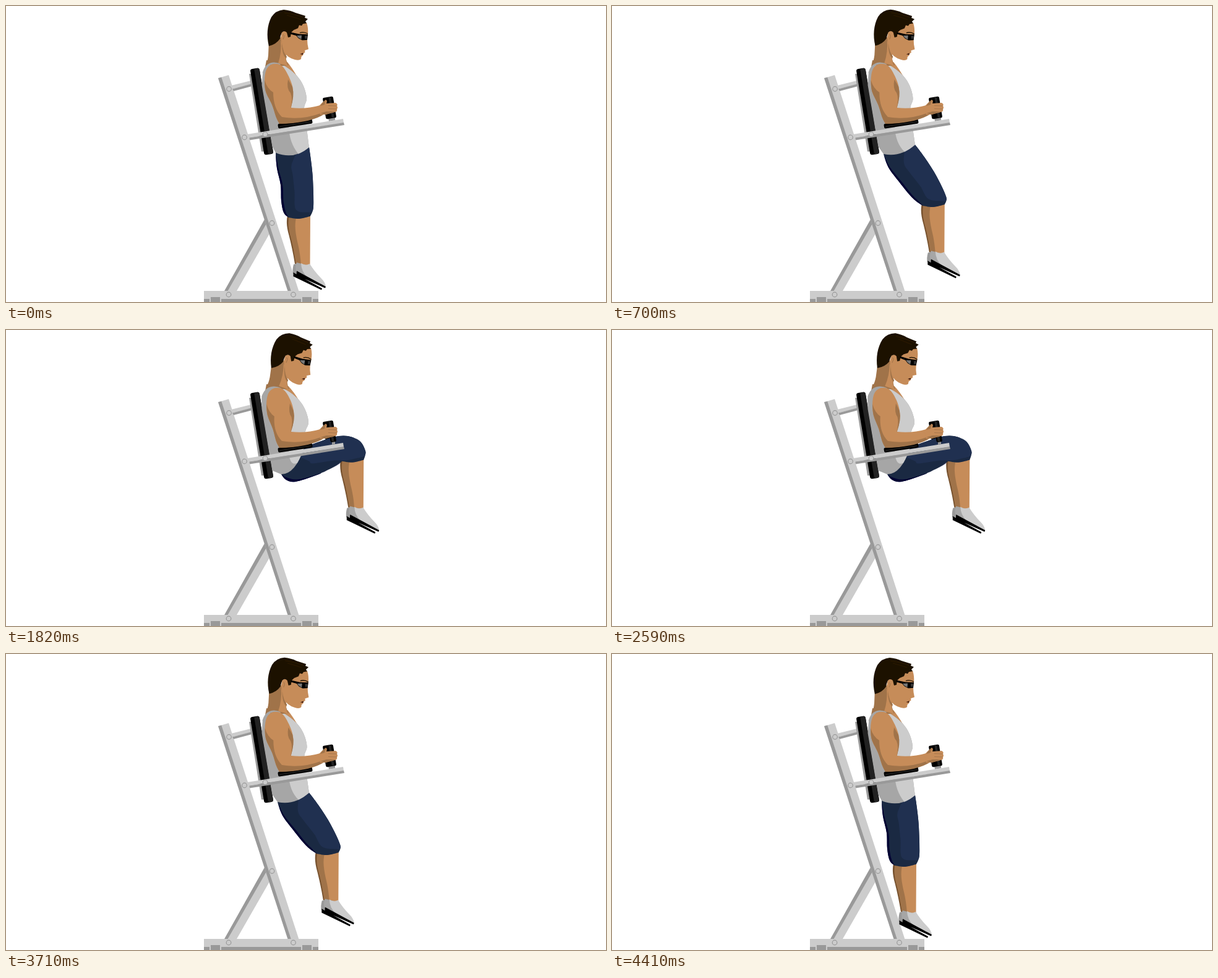
An HTML page that plays this animation: 970 px wide and 480 px high, repeating every 4550 ms.

```html
<!DOCTYPE html>
<html lang="en">
<head>
<meta charset="utf-8">
<title>Captain's chair knee raise</title>
<style>
html, body { margin: 0; width: 100%; height: 100%; overflow: hidden; background: #fff; }
svg { display: block; width: 970px; height: 480px; }
.light { fill: #ccc; }
.mid { fill: #a6a6a6; }
.dark { fill: #999; }
.skin { fill: #c68c59; }
.shade { fill: #a07349; }
.deep { fill: #77522f; }
.black { fill: #000; }
.soft { fill: #222; }
.hair { fill: #1c1100; }
.bolt { fill: #ccc; stroke: #999; stroke-width: 1.2; }
</style>
</head>
<body>
<svg viewBox="0 0 970 480">
  <!-- frame -->
  <path class="light" d="M419 347L437 350L373 462H354Z"/>
  <path class="dark" d="M418 346L421 353L358.500 462H353Z"/>
  <path class="light" d="M343 117L360 112L473.300 462H455.500Z"/>
  <path class="dark" d="M343 117L348.200 115.500L460.700 462H455.500Z"/>
  <path class="light" d="M320 462H505V480H320Z"/>
  <path class="dark" d="M320 475H329V480H320ZM331 472H346V480H331ZM348 475H477V480H348ZM479 472H494V480H479ZM496 475H505V480H496Z"/>
  <path class="light" d="M364 129L396 121V127L366 134.500Z"/>
  <path class="dark" d="M366 134.500L396 126.500V130.500L368 138Z"/>
  <path class="dark" d="M393 110H398L418 236H413Z"/>
  <g transform="translate(413.500 171) rotate(-9.400)">
    <rect class="black" x="-7.500" y="-70.500" width="15" height="141" rx="3.500"/>
    <rect class="soft" x="-1" y="-70.500" width="8.500" height="141" rx="3"/>
  </g>

  <!-- far handle -->
  <path class="dark" d="M521 182L527 181V186L522 187Z"/>
  <rect class="black" x="-8.500" y="-17.500" width="11" height="35" rx="2.500" transform="translate(523 165) rotate(-9.400)"/>

  <!-- lower leg -->
  <g id="shin">
    <path class="deep" d="M456 336C453 346 453 356 457.500 372C461 386 464.500 402 467 418H478L474 336Z"/>
    <path class="shade" d="M459 336C455 350 456 360 461 378C465 394 467 408 469 419H480L478 336Z"/>
    <path class="skin" d="M471 336C466 352 467 362 471 382C475 398 476 408 477 420H491.500L492 336Z"/>
    <path class="dark" d="M465 419Q462.500 428 464 434L472 438V417Z"/>
    <path class="mid" d="M470 416Q467 423 469 430L492 443L486 420Z"/>
    <path class="light" d="M477 417Q484 422 491 418C496 426 502 434 510 442Q516 448 517 455L488 441Q477 430 477 417Z"/>
    <path class="black" d="M464.500 432L471 436L511 458L510 460.500L464.500 438.500ZM470 429.500L517 455L516 457.500L469.500 436.500Z"/>
  </g>

  <!-- shorts -->
  <path id="shorts" fill="#1a2942"/>
  <path id="panel" fill="#203050"/>
  <path id="rim" fill="#000033"/>

  <!-- torso -->
  <path id="neck" class="shade"/>
  <path id="chestSkin" class="skin"/>
  <path id="shirtBack" class="mid"/>
  <path id="shirtFront" class="light"/>

  <!-- head -->
  <g id="head">
    <path class="shade" d="M425 56L424 80Q423 90 420 95L440 98L457 96Q451 88 453 76L448 50Z"/>
    <path class="skin" d="M444 55Q446 75 440 93L456 97Q451 89 453 76Z"/>
    <path class="skin" d="M446 42L462 38L474 28L486 27Q489 36 488 45L487 54Q487 62 489 70L483 72L483.500 75L481 77L480 80L477.500 82L477 86Q474 89 467 87Q453 83 449 73L444 52Z"/>
    <path class="shade" d="M446 60Q448 76 454 82L453 85Q446 79 446 60Z"/>
    <path class="hair" d="M425 65C421 48 422 32 429 18Q436 7 449 6Q460 7 468 11L484 16L483 19L488 21L484 25L486 28L480 29L478 32L474 31L472 36L465 39L461 43L460 50L456 51L454 43Q450 39 446 43Q444 47 443 53Q437 62 425 65Z"/>
    <path d="M450 11L466 14L480 18M454 15L468 19L477 22" fill="none" stroke="#2d1a00"/>
    <path class="skin" d="M446 43Q453 40 454 47Q453 54 449 55Q445 53 446 43Z"/>
    <path d="M448 46Q451 48 448 54" fill="none" stroke="#a07349"/>
    <path class="black" d="M460 42.500L474 45.500L488 46L487 55L479 55.500L473 52.500L469 48L460 45.500Z"/>
    <path d="M470 48L478 47.500L477.500 54L473 51.500Z" fill="#777"/>
    <path d="M483 48H487V53H483Z" fill="#333"/>
    <path d="M475 43.500Q481 41 488 45" fill="none" stroke="#1c1100" stroke-width="1.300"/>
    <path d="M475.500 78L480.500 76L480 79Z" fill="#3a160c"/>
  </g>
  <path id="strap" fill="none" stroke="#a6a6a6" stroke-width="3"/>

  <!-- arm rest -->
  <path class="light" d="M387 208.500L545 183L546 189.500L389 214Z"/>
  <path class="dark" d="M393 213.500L546 189L547 193L394 217.500Z"/>
  <g transform="translate(467.500 190.800) rotate(-8.500)">
    <rect class="black" x="-28" y="-3.800" width="56" height="7.600" rx="2"/>
    <rect class="soft" x="-26" y="0" width="52" height="1.500"/>
  </g>
  <path class="dark" d="M527 181L532 180V185L527 186Z"/>
  <g transform="translate(523 165) rotate(-9.400)">
    <rect class="black" x="-1" y="-17.500" width="9.500" height="35" rx="2.500"/>
    <rect class="soft" x="1" y="-16.500" width="4" height="33"/>
  </g>
  <g id="bolts"></g>

  <!-- arm -->
  <path id="arm" class="skin"/>
  <path id="armShade" class="shade"/>
  <path id="crease" class="shade"/>
  <path class="skin" d="M505 163L511 157L517 152Q520 153 518 158L533 157Q537 159 535 162Q537 165 535 167Q536 171 532 172L517 176L508 176Z"/>
  <path class="shade" d="M508 162L513 155L517 152L515 160ZM508 174L518 171L532 171L517 176Z"/>
  <path d="M521 161.500L535 162M521 166.500L535 167" fill="none" stroke="#a07349" stroke-width=".8"/>
</svg>
<script>
const $ = id => document.getElementById(id);
const STEP = 70, STEPS = 65, TOP = 30;
const HIP = [456, 230], THIGH = 106, REST = 9;
const rad = a => a * Math.PI / 180;

// Shorts outline at four thigh angles: back edge, front edge, then the shirt hem control.
const ANGLES = [0, 27, 66, 95];
const POSES = [
  [436,238, 438,263, 444,290, 445,316, 449,335, 497,325, 496,280, 493,250, 490,229, 466,250],
  [439,240, 447,262, 464,285, 480,305, 491,316, 540,309, 524,275, 505,245, 490,225, 466,246],
  [441,236, 450,249, 470,258, 505,264, 532,269, 582,248, 565,228, 525,214, 492,210, 477,241],
  [445,234, 453,243, 468,246, 500,236, 530,222, 581,196, 569,178, 538,172, 482,190, 468,234]
].map(n => Array.from({ length: n.length / 2 }, (_, i) => [n[2 * i], n[2 * i + 1]]));
const HEM = [[457, 343], [474, 345], [492, 341]];
const PINNED = [0, 8, 9];

const mix = (a, b, t) => [a[0] + (b[0] - a[0]) * t, a[1] + (b[1] - a[1]) * t];
const add = (a, b) => [a[0] + b[0], a[1] + b[1]];

function turn(p, deg) {
  const c = Math.cos(rad(deg)), s = Math.sin(rad(deg));
  const x = p[0] - HIP[0], y = p[1] - HIP[1];
  return [HIP[0] + x * c - y * s, HIP[1] + x * s + y * c];
}

// Smooth curve through points, without the leading command.
function curve(pts) {
  return pts.map((q, i) => {
    if (!i) return q.join(" ");
    const a = pts[i - 2] || pts[i - 1], b = pts[i - 1], d = pts[i + 1] || q;
    const c1 = add(b, [(q[0] - a[0]) / 6, (q[1] - a[1]) / 6]);
    const c2 = add(q, [(b[0] - d[0]) / 6, (b[1] - d[1]) / 6]);
    return `C${[...c1, ...c2, ...q].join(" ")}`;
  }).join("");
}

const set = (id, d) => $(id).setAttribute("d", d);

// Sine ease with a slightly quicker start.
function thighAngle(k) {
  const t = k / TOP, u = Math.PI * t;
  return 99 * (1 - Math.cos(u)) / 2 + 4 * Math.sin(u) * (1 - t);
}

function poseAt(angle) {
  const i = angle < ANGLES[1] ? 0 : angle < ANGLES[2] ? 1 : 2;
  const t = (angle - ANGLES[i]) / (ANGLES[i + 1] - ANGLES[i]);
  return POSES[i].map((p, j) => {
    const q = POSES[i + 1][j];
    if (PINNED.includes(j)) return mix(p, q, t);
    return turn(mix(turn(p, ANGLES[i]), turn(q, ANGLES[i + 1]), t), -angle);
  });
}

function drawShorts(p, knee) {
  const [h0, h1, h2] = HEM.map(h => add(h, knee));
  const back = [...p.slice(0, 5), h0];
  const front = [h2, ...p.slice(5, 9)];
  set("shorts", `M${curve(back)}L${curve([h0, h1, h2])}L${curve(front)}Z`);
  const inner = [
    mix(p[0], p[8], .68), mix(p[1], p[7], .43), mix(p[2], p[7], .4),
    mix(p[3], p[6], .42), mix(p[4], p[5], .42), mix(h2, p[5], .4)
  ];
  set("panel", `M${curve(inner)}L${curve([inner[5], ...front.slice(1)])}Z`);
  const edge = [
    h0, mix(p[4], p[5], .07), mix(p[3], p[5], .07),
    mix(p[2], p[6], .06), mix(p[1], p[7], .04), p[0]
  ];
  set("rim", `M${curve(back)}L${curve(edge)}Z`);
}

function drawTorso(p, lean) {
  const [left, right, hem] = [p[0], p[8], p[9]];
  const x = (v, w = 1) => v + lean * w;
  const l = x(415, -.6);
  const chest = curve([
    [x(443, .4), 93], [x(456), 101], [x(471), 114], [x(481), 130],
    [x(486), 150], [x(482, .6), 166], [485, 190], right
  ]);
  set("neck", `M421 88L${x(453, .5)} 90L${x(470)} 114L440 112L418 104Z`);
  set("chestSkin", `M440 90L${x(455, .5)} 91Q${x(463)} 101 ${x(471)} 115L450 112Z`);
  set("shirtBack", `M${l} 110Q${x(418, -.3)} 94 432 91L${chest}Q${hem} ${left}L430.500 228L424 190L413.500 128Z`);
  const split = mix(mix(left, hem, .65), mix(hem, right, .65), .65);
  set("shirtFront", `M${chest}Q${mix(hem, right, .65)} ${split}Q458 222 457 195L450 120Z`);
  set("strap", `M${x(416, -.5)} 109Q${x(420, -.3)} 94 432 93Q438 92.500 ${x(443, .4)} 95.500`);
}

function drawArm(lean) {
  const x = (v, w = 1) => v + lean * w;
  const outline = [
    [442, 191], [437, 181], [x(430, .4), 160], [x(420), 139], [x(418), 120], [x(421), 103],
    [x(429), 95], [x(439), 94], [x(448), 99], [x(457), 114], [x(463, .6), 130],
    [x(464, .4), 146], [461, 165]
  ];
  set("arm", `M${curve(outline)}Q485 168 512 160L516 174Q492 189 442 191Z`);
  set("armShade", `M${curve(outline.slice(0, 5))}Q${x(422)} 134 ${x(432, .6)} 140Q432 166 446 180Q480 186 514 172L515 175Q492 190 442 191Z`);
  set("crease", `M${x(456)} 119Q${x(453)} 134 ${x(460, .5)} 141Q464 150 460 166Q${x(467, .4)} 146 ${x(463, .6)} 131Z`);
}

function draw(k) {
  const angle = thighAngle(k), a = rad(REST + angle), r = rad(REST);
  const knee = [THIGH * (Math.sin(a) - Math.sin(r)), THIGH * (Math.cos(a) - Math.cos(r))];
  const lift = angle / ANGLES[3], lean = 3 * lift ** 1.4;
  const pose = poseAt(angle);
  $("shin").setAttribute("transform", `translate(${knee})`);
  $("head").setAttribute("transform", `rotate(${5.3 * lift ** 1.6} 462 106)`);
  drawShorts(pose, knee);
  drawTorso(pose, lean);
  drawArm(lean);
}

for (const [cx, cy] of [[360.5, 134.5], [385.5, 213], [419, 208], [430, 352], [360, 468], [464.5, 468]]) {
  const c = document.createElementNS("http://www.w3.org/2000/svg", "circle");
  Object.entries({ class: "bolt", cx, cy, r: 3.8 }).forEach(([n, v]) => c.setAttribute(n, v));
  $("bolts").append(c);
}

// Raise, hold at the top, lower, short rest.
const start = performance.now();
let shown = -1;
function tick() {
  const n = Math.floor((performance.now() - start) / STEP) % STEPS;
  const k = n <= TOP ? n : Math.min(TOP, Math.max(0, 63 - n));
  if (k !== shown) draw(shown = k);
  requestAnimationFrame(tick);
}
tick();
</script>
</body>
</html>
```
